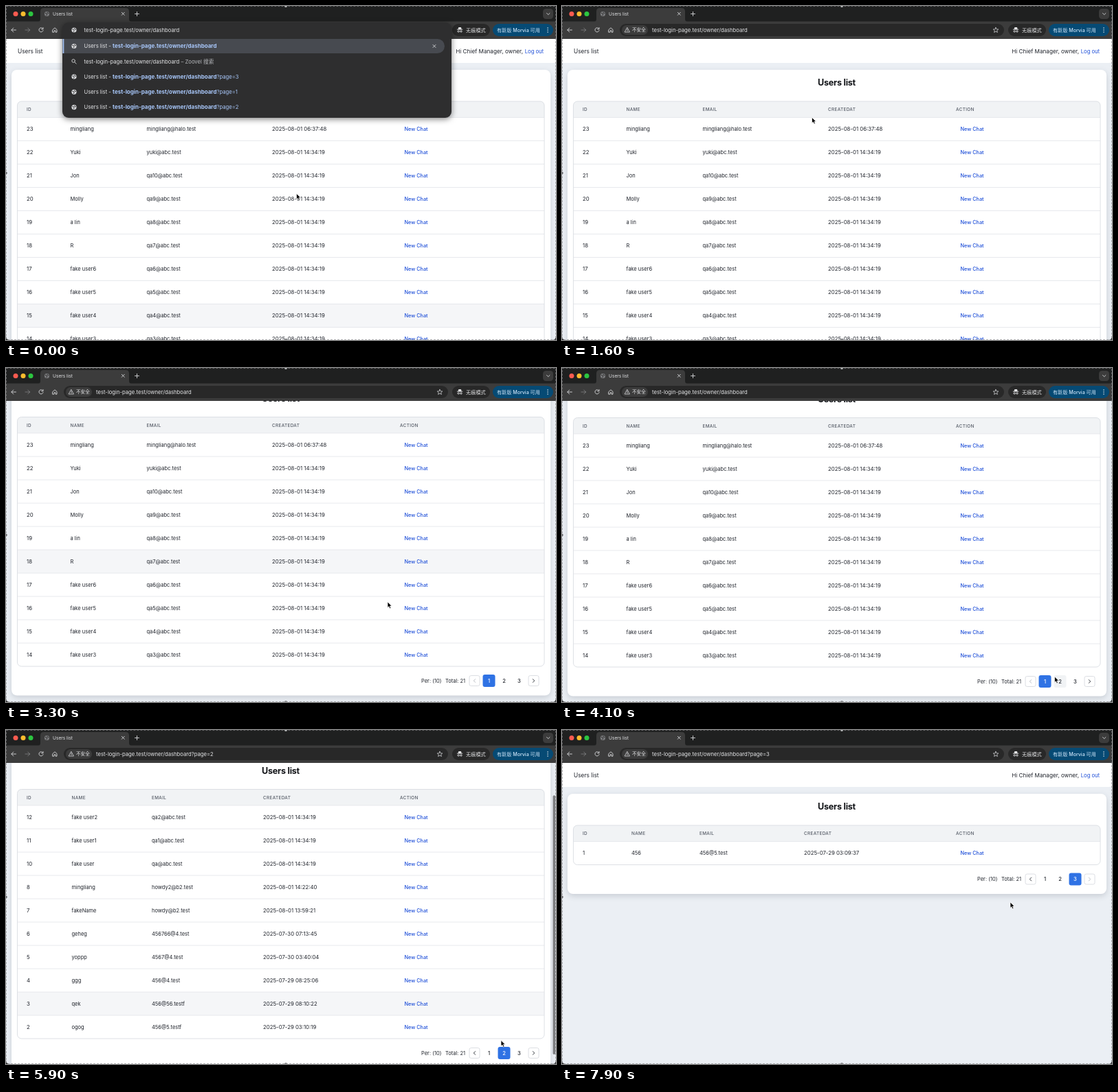
These frames come from a looping animation (800 by 487 pixels, 8000 ms). An HTML page:

```html
<!DOCTYPE html>
<html lang="en">
<head>
<meta charset="utf-8">
<title>Users list</title>
<style>
  html, body { margin: 0; width: 100%; height: 100%; overflow: hidden; background: #1f2020; }
  svg { display: block; font-family: Inter, "Noto Sans CJK SC", "Noto Sans CJK", sans-serif; }
  text { white-space: pre; }
  .card { filter: drop-shadow(0 3px 4px rgba(20, 30, 50, .16)); }
  .icon { fill: none; stroke: #d6d7da; stroke-width: .9; stroke-linecap: round; stroke-linejoin: round; }
</style>
</head>
<body>
<svg id="stage" width="800" height="487" viewBox="0 0 800 487"></svg>
<script>
const INK = '#20242c', LINK = '#1d4ed8', LINE = '#e5e7eb', HEAD = '#f1f3f5', PALE = '#e4e5e7';
const BAR = '#3c3c3c', DARK = '#282828', BLUE = '#2f72e4';
const LOOP = 8000, ADDRESS = 'test-login-page.test/owner/dashboard';

const text = (x, y, s, size = 7.5, fill = INK, more = '') =>
  `<text x="${x}" y="${y + size * .36}" font-size="${size}" fill="${fill}" ${more}>${s}</text>`;
const box = (x, y, w, h, r, fill, more = '') =>
  `<rect x="${x}" y="${y}" width="${w}" height="${h}" rx="${r}" fill="${fill}" ${more}/>`;
const icon = (d, more = '') => `<path class="icon" d="${d}" ${more}/>`;
const dot = (x, y, r, fill) => `<circle cx="${x}" cy="${y}" r="${r}" fill="${fill}"/>`;
const globe = (x, y, color = '#d6d7da') => dot(x, y, 3.6, color) +
  `<path d="M${x - 2.6} ${y - 1}l2 .3 .8 1.4 -1 2M${x + .6} ${y - 2.8}l.3 1.6 2 .6" fill="none" stroke="${DARK}" stroke-width=".9"/>`;

// Tables: column positions and rows of id, name, email, creation time
const TOP = 162.5, ROW = 34;
const noon = '2025-08-01 14:34:19';
const people = ['Yuki', 'Jon', 'Molly', 'a lin', 'R', 'fake user6', 'fake user5', 'fake user4', 'fake user3'];
const pages = [
  { cols: [30, 93.5, 204.5, 387], rows: [
    [23, 'mingliang', 'mingliang@halo.test', '2025-08-01 06:37:48'],
    ...people.map((name, i) => [22 - i, name, i ? `qa${11 - i}@abc.test` : 'yuki@abc.test', noon])] },
  { cols: [30, 95.5, 212, 374], rows: [
    [12, 'fake user2', 'qa2@abc.test', noon],
    [11, 'fake user1', 'qa1@abc.test', noon],
    [10, 'fake user', 'qa@abc.test', noon],
    [8, 'mingliang', 'howdy2@b2.test', '2025-08-01 14:22:40'],
    [7, 'fakeName', 'howdy@b2.test', '2025-08-01 13:59:21'],
    [6, 'geheg', '456766@4.test', '2025-07-30 07:13:45'],
    [5, 'yoppp', '4567@4.test', '2025-07-30 03:40:04'],
    [4, 'ggg', '456@4.test', '2025-07-29 08:25:06'],
    [3, 'qek', '456@56.testf', '2025-07-29 08:10:22'],
    [2, 'ogog', '456@5.testf', '2025-07-29 03:10:19']] },
  { cols: [30, 101, 200, 352], rows: [[1, '456', '456@5.test', '2025-07-29 03:09:37']] }
];

function pager(y, current) {
  const arrow = (x, dir, off) => box(x - 7.5, y - 7.5, 15, 15, 2.5, 'white', 'stroke="#d3d6dc" stroke-width=".8"') +
    icon(`M${x - dir * 1.2} ${y - 2.4}l${dir * 2.4} 2.4l${-dir * 2.4} 2.4`, `style="stroke:${off ? '#b4b7be' : INK}"`);
  const numbers = [702.5, 724.5, 746.5].map((x, i) =>
    (i === current ? box(x - 9, y - 9, 18, 18, 3, BLUE) : '') +
    (i === current + 1 ? box(x - 9, y - 9, 18, 18, 3, HEAD, `id="over${current}"`) : '') +
    text(x, y, i + 1, 7.6, i === current ? 'white' : INK, 'text-anchor="middle" font-weight="500"'));
  return text(604, y, 'Per: (10)') + text(639, y, 'Total: 21') +
    arrow(681.5, -1, current === 0) + numbers.join('') + arrow(767.5, 1, current === 2);
}

function pageMarkup({ cols, rows }, n) {
  const end = TOP + ROW * rows.length;
  const heads = ['ID', 'NAME', 'EMAIL', 'CREATEDAT', 'ACTION'].map((s, i) =>
    text([...cols, 573][i], 151, s, 6.4, '#555b66', 'letter-spacing=".33" font-weight="500"'));
  const body = rows.map((row, i) => {
    const y = TOP + 17 + ROW * i;
    return (i ? box(17, y - 17.4, 766, .9, 0, LINE) : '') +
      row.map((s, c) => text(cols[c], y, s, c % 3 ? 7.5 : 7.8)).join('') +
      text(579.5, y, 'New Chat', 7.3, LINK, 'font-weight="500"');
  });
  return `<g id="page${n}">` + box(0, 48, 800, 35, 0, 'white') +
    text(17, 66, 'Users list', 8.35) +
    text(752, 66, 'Hi Chief Manager, owner,', 8.2, INK, 'text-anchor="end"') +
    text(782, 66.5, 'Log out', 7.6, LINK, 'text-anchor="end"') +
    box(8, 93, 784, end - 50.5, 8, 'white', 'class="card"') +
    text(399.5, 111.5, 'Users list', 12.6, '#111317', 'text-anchor="middle" font-weight="700" letter-spacing="-.25"') +
    `<path d="M16.5 162.5V145q0-6 6-6H777q6 0 6 6v17.5z" fill="${HEAD}"/>` +
    box(17, TOP, 766, ROW, 0, '#f5f6f8', `id="hover${n}"`) +
    box(17, 162, 766, .9, 0, LINE) + heads.join('') + body.join('') +
    box(16.5, 139, 766.5, end - 139, 6, 'none', 'stroke="#dadde3" stroke-width=".9"') +
    pager(end + 21, n) + '</g>';
}

const browserBar =
  box(0, 0, 800, 48, 0, '#1f2020') +
  dot(14, 11.5, 3.5, '#fb5b50') + dot(25, 11.5, 3.5, '#fbbc2e') + dot(36, 11.5, 3.5, '#2cc640') +
  `<path d="M46 23q4 0 4-4V8q0-5 5-5H174q5 0 5 5v11q0 4 4 4z" fill="${BAR}"/>` +
  box(0, 22.5, 800, 25.5, 0, BAR) +
  globe(59.5, 11.5, '#7a7b7d') + text(68, 11.5, 'Users list', 6.6, PALE) +
  icon('M168.3 9.3l4 4m0-4l-4 4M187.5 11.5h6m-3-3v6') +
  box(781, 4, 15, 15, 4.5, BAR) + icon('M786.5 10.5l2.2 2.2 2.2-2.2') +
  icon('M14.5 35h-6.5m2.8-3l-3 3 3 3') +
  icon('M28 35h6.5m-2.8-3l3 3-3 3', 'opacity=".4"') +
  icon('M53.6 33a3.1 3.1 0 1 0 .5 2.6M54 31.5v2.3h-2.3') +
  icon('M68 34.5l3-2.7 3 2.7v3.7h-2v-2.4h-2v2.4h-2z') +
  box(649, 26, 55, 18, 9, DARK) +
  `<path d="M657.5 34l.8-3h3.6l.8 3z" fill="${PALE}"/>` +
  icon('M656.3 34.2h7.6M657 37a1.2 1.2 0 1 0 2.4 0a1.2 1.2 0 1 0-2.4 0M660.8 37a1.2 1.2 0 1 0 2.4 0a1.2 1.2 0 1 0-2.4 0') +
  text(669, 35, '无痕模式', 7.2, PALE, 'font-weight="500"') +
  box(708, 26, 88, 18, 9, '#064a74') +
  text(714, 35, '有新版 Morvia 可用', 7.1, '#cfe6fa', 'font-weight="500"') +
  [32, 35, 38].map(y => dot(788, y, .8, PALE)).join('');

const addressField = '<g id="field">' + box(84, 26, 559, 18, 9, DARK) +
  box(87, 28, 38, 14, 7, BAR) +
  icon('M95 31.6l3.5 6.4h-7zM95 33.8v1.8m0 1.1v.1', 'style="stroke-width:.8"') +
  text(102, 35, '不安全', 6.6, PALE) +
  `<text id="url" x="131" y="37.7" font-size="7.7" fill="${PALE}"></text>` +
  icon('M631 31.3l1.1 2.5 2.7.2-2.1 1.8.7 2.7-2.4-1.5-2.4 1.5.7-2.7-2.1-1.8 2.7-.2z', 'style="stroke-width:.75"') + '</g>';

const visited = (y, query) => globe(99, y) + text(113.5, y,
  `Users list - <tspan fill="#a8c7fa"><tspan font-weight="700" font-size="8">${ADDRESS}</tspan>${query}</tspan>`, 7.7, PALE);
const suggestions = '<g id="drop">' +
  box(82, 24, 566, 139, 9, '#2e2e2f', 'style="filter:drop-shadow(0 2px 4px rgba(0,0,0,.5))"') +
  '<path d="M84 48H627.5a10.5 10.5 0 0 1 0 21H84z" fill="#474a50"/>' + box(82.5, 48, 1.8, 21, 0, '#a8c7fa') +
  globe(99, 35) + text(113.5, 35, ADDRESS, 7.7, PALE) +
  visited(58.5, '') + icon('M621 56.5l4 4m0-4l-4 4') +
  icon('M100.4 80a2.3 2.3 0 1 0-4.6 0a2.3 2.3 0 1 0 4.6 0M99.8 81.8l2.4 2.4') +
  text(113.5, 81, `${ADDRESS}<tspan fill="#b6b8bc"> – Zoovel 搜索</tspan>`, 7.7, PALE) +
  [3, 1, 2].map((p, i) => visited(103 + 22.3 * i, `?page=${p}`)).join('') + '</g>';

stage.innerHTML =
  `<clipPath id="win"><path d="M0 0H800V481q0 6-6 6H6q-6 0-6-6z"/></clipPath>
  <g clip-path="url(#win)">` + box(0, 0, 800, 487, 0, '#ebeff4') +
  `<g id="doc">${pages.map(pageMarkup).join('')}</g>` +
  box(795.5, 50, 3.6, 378, 1.8, '#7c7d80', 'id="thumb"') +
  browserBar + addressField + suggestions + '</g>' +
  '<rect x=".4" y=".4" width="799.2" height="486.2" fill="none" stroke="#8b8c8e" stroke-width=".7" stroke-dasharray="3 2"/>' +
  dot(407, 0, 2, '#b6b7b9') + dot(407, 487, 2, '#8b8c8e') + dot(0, 243.5, 1.8, '#66676a') +
  '<path id="cursor" d="M0 0V8.4L1.9 6.7 3.2 9.7 4.8 9 3.5 6.1H6.1z" fill="black" stroke="white" stroke-width=".7"/>';

const $ = id => document.getElementById(id);
const show = (id, on) => $(id).style.display = on ? '' : 'none';
const linear = p => p;
const easeOut = p => p * (2 - p);

// Interpolates rows of [time, ...values]
function along(keys, t, ease) {
  const i = keys.findIndex(k => k[0] > t);
  if (i < 0) return keys[keys.length - 1].slice(1);
  if (i === 0) return keys[0].slice(1);
  const a = keys[i - 1], b = keys[i], p = ease((t - a[0]) / (b[0] - a[0]));
  return a.slice(1).map((v, j) => v + (b[j + 1] - v) * p);
}

const OPEN = [0, 4700, 7200];      // when each page appears
const SCROLLS = [2300, 5700];      // when each scroll gesture begins
const pointerPath = [
  [900, 422.5, 273.5], [1400, 364, 162.4], [1600, 363.5, 162.4], [2200, 363, 258], [3000, 363, 258],
  [3300, 555, 341], [3700, 716.5, 450], [4100, 716.5, 450], [4500, 720, 452.5], [6100, 720, 452.5],
  [6500, 743, 453], [7200, 743, 453], [7800, 652, 251]
];
const scrollPath = [
  [SCROLLS[0], 0], [2500, 41], [2800, 67.5], [3300, 67.5], [3500, 66.5], [OPEN[1] - 1, 66.5],
  [OPEN[1], 0], [SCROLLS[1], 0], [5900, 52.5], [6100, 66.5], [OPEN[2] - 1, 66.5], [OPEN[2], 0]
];
const pointerAt = t => along(pointerPath, t, linear);
const scrollAt = t => along(scrollPath, t, easeOut)[0];

// The highlight trails the pointer a little and stays on its row during a scroll.
function hoveredRow(t, count) {
  if (t < 500) return 8;
  const held = SCROLLS.find(s => t > s && t <= s + 500);
  const y = pointerAt(held ?? t - 200)[1] + scrollAt(held ?? t);
  const row = Math.floor((y - TOP) / ROW);
  return row < count ? row : -1;
}

function draw(t) {
  const page = OPEN.findLastIndex(at => t >= at);
  const [x, y] = pointerAt(t), scroll = scrollAt(t);
  const row = hoveredRow(t, pages[page].rows.length);

  pages.forEach((_, i) => show('page' + i, i === page));
  $('doc').setAttribute('transform', `translate(0 ${-scroll})`);
  show('hover' + page, row >= 0);
  $('hover' + page).setAttribute('y', TOP + ROW * row);
  show('over0', t >= 3700);
  show('over1', t >= 6500);

  show('thumb', SCROLLS.some(s => t > s && t < s + 900));
  $('thumb').setAttribute('y', 50 + .86 * scroll);
  show('drop', t < 100);
  show('field', t >= 100);
  $('url').textContent = ADDRESS + (page ? `?page=${page + 1}` : '');
  $('cursor').setAttribute('transform', `translate(${x} ${y})`);
}

const start = performance.now();
function tick() {
  const t = (performance.now() - start) % LOOP;
  draw(Math.floor(t / 100) * 100);
  requestAnimationFrame(tick);
}
tick();
</script>
</body>
</html>
```
